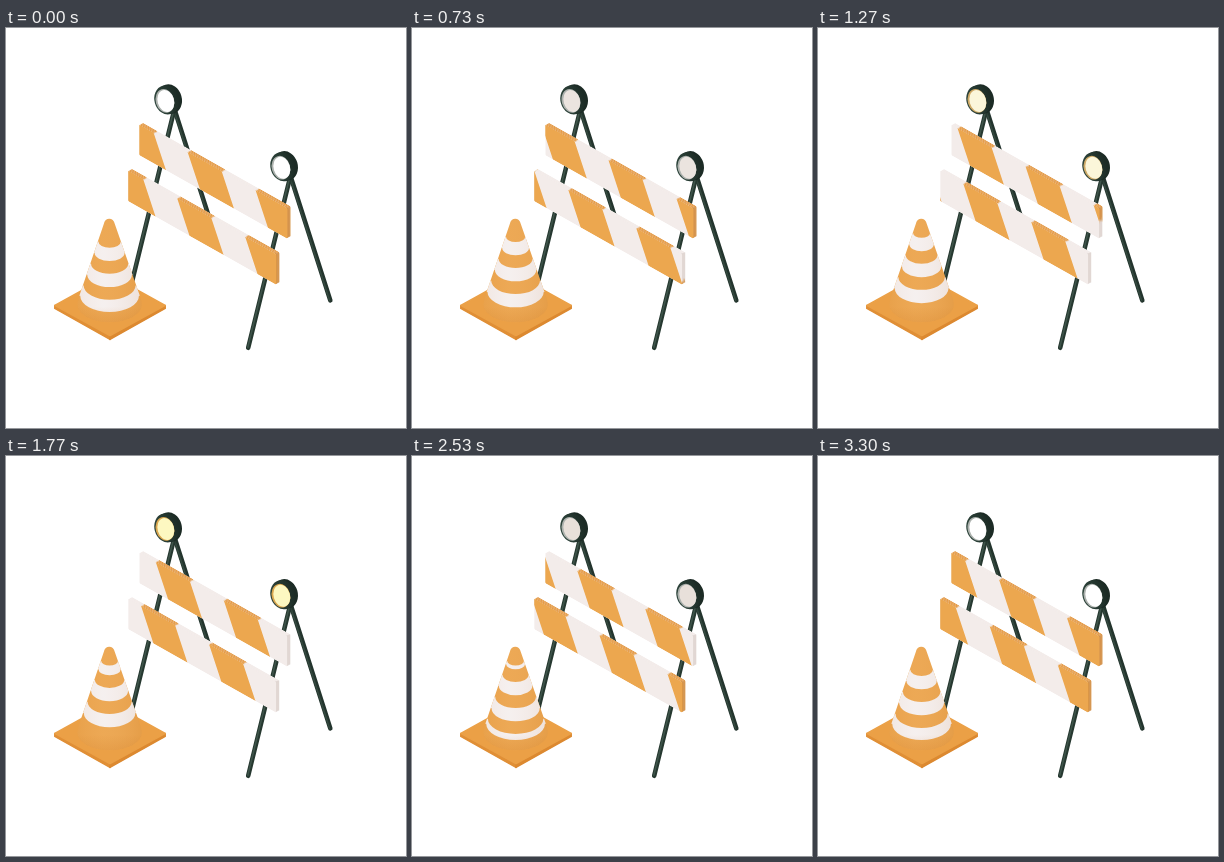
Write an HTML page that moves like this. It is 400 px wide and 400 px high and loops after 3.33 s.

```html
<!DOCTYPE html>
<html lang="en">
<head>
<meta charset="utf-8">
<title>Road barrier</title>
<style>
html, body { margin: 0; width: 100%; height: 100%; overflow: hidden; background: #fff; }
svg { display: block; width: 100%; height: 100%; }
.back { color: #e4973f; }
.front { color: #eca74f; }
</style>
</head>
<body>
<svg viewBox="0 0 400 400" xmlns="http://www.w3.org/2000/svg">
  <defs>
    <linearGradient id="coneShade">
      <stop offset="0" stop-color="#b4651c" stop-opacity=".06"/>
      <stop offset=".4" stop-color="#fff" stop-opacity=".04"/>
      <stop offset="1" stop-color="#a85a14" stop-opacity=".1"/>
    </linearGradient>
    <linearGradient id="coneFoot" x1="0" y1="0" x2="0" y2="1">
      <stop offset=".85" stop-color="#c56a10" stop-opacity="0"/>
      <stop offset="1" stop-color="#c56a10" stop-opacity=".16"/>
    </linearGradient>
    <linearGradient id="rim">
      <stop offset="0" stop-color="#2f463d"/>
      <stop offset="1" stop-color="#1c2b25"/>
    </linearGradient>
    <path id="cone" d="M97.8 196C98.8 189 107.6 189 108.8 196L134.6 270Q136 274 135.8 277A32.2 17.2 0 0 1 71.4 277Q71.2 274 72.6 270Z"/>
    <clipPath id="coneClip"><use href="#cone"/></clipPath>
    <clipPath id="boardClip"><rect width="148" height="30.8" rx="1.3"/></clipPath>
    <g id="trestle">
      <g fill="none" stroke-linecap="round">
        <path d="M169 83L208.3 205.6" stroke="#23342d" stroke-width="4.6"/>
        <path d="M168.4 84L207.6 205.6" stroke="#34493f" stroke-width="1.5"/>
        <path d="M168 83L126.2 253" stroke="#263830" stroke-width="4.6"/>
        <path d="M167.3 84L125.8 252.4" stroke="#3e544a" stroke-width="1.5"/>
      </g>
      <g transform="rotate(-16 162 71.5)">
        <ellipse cx="163.6" cy="71.6" rx="12.2" ry="15" fill="#1c2b25"/>
        <ellipse cx="160.6" cy="71.5" rx="12.2" ry="14.8" fill="url(#rim)"/>
        <ellipse cx="158.7" cy="72" rx="9.2" ry="12" class="edge"/>
        <ellipse cx="159.5" cy="72.3" rx="8.2" ry="11.2" class="lens"/>
      </g>
    </g>
  </defs>

  <use href="#trestle"/>
  <use href="#trestle" x="116" y="66.8"/>
  <g id="boards"></g>

  <g stroke-linejoin="round" stroke-width="1.5" transform="translate(0 -.6)">
    <path d="M48.8 278L104 308.5V312L48.8 281Z" fill="#e08f36" stroke="#e08f36"/>
    <path d="M159.2 278L104 308.5V312L159.2 281Z" fill="#dc8930" stroke="#dc8930"/>
    <path d="M48.8 278L104 247.5L159.2 278L104 308.3Z" fill="#eba046" stroke="#eba046"/>
  </g>
  <use href="#cone" fill="#eca54e"/>
  <path id="bands" fill="#f5efee" clip-path="url(#coneClip)"/>
  <use href="#cone" fill="url(#coneShade)"/>
  <use href="#cone" fill="url(#coneFoot)"/>
</svg>
<script>
const LOOP = 3330, STEP = 68, AXIS = 103.6;
const $ = id => document.getElementById(id);

// Boards: a sheared striped rectangle, with stacked copies behind it for thickness
function board(id, x, y) {
  let stripes = '';
  for (let k = -2; k < 4; k++) {
    const s = k * STEP;
    stripes += `M${s} 0h34l12.5 30.8h-34z`;
  }
  const place = (dx, dy) => `matrix(1 .565 0 1 ${x + dx} ${y + dy})`;
  let back = '';
  for (let i = 4; i > 0; i--) {
    back += `<use class="back" href="#${id}" transform="${place(i * .78, i * -.45)}"/>`;
  }
  return back + `<g class="front" transform="${place(0, 0)}">` +
    '<path d="M147 0l4.1 -3.5v30.3l-4.1 4z" fill="#6b4a3a" fill-opacity=".13"/>' +
    `<g id="${id}" clip-path="url(#boardClip)"><rect width="148" height="30.8" fill="#f3ecea"/>` +
    `<path id="${id}Stripes" d="${stripes}" fill="currentColor"/></g></g>`;
}
$('boards').innerHTML = board('upper', 133.3, 96.4) + board('lower', 122.2, 142.4);

// Front half of the ring whose lowest point is at y
function ring(y) {
  const c = (y + 33.2) / 1.184, r = 5 + .335 * (c - 195);
  return { c, r, ry: r * .55 };
}

function band(top, bottom) {
  const a = ring(bottom), b = ring(top);
  return `M60 ${a.c}H${AXIS - a.r}A${a.r} ${a.ry} 0 0 0 ${AXIS + a.r} ${a.c}H150` +
    `V${b.c}H${AXIS + b.r}A${b.r} ${b.ry} 0 0 1 ${AXIS - b.r} ${b.c}H60Z`;
}

function bands(p) {
  let d = '';
  for (let k = 0; k < 5; k++) {
    const low = 311 - 26 * (p + k);
    const top = Math.max(209.5, low - 13.3), bottom = Math.min(283.8, low);
    if (bottom > top) d += band(top, bottom);
  }
  return d;
}

const rgb = (...v) => `rgb(${v.map(Math.round)})`;
const paint = (cls, color) => document.querySelector('.' + cls).style.fill = color;

function draw(t) {
  const p = (t % LOOP) / LOOP;
  $('upperStripes').setAttribute('transform', `translate(${-19.8 + STEP * p})`);
  $('lowerStripes').setAttribute('transform', `translate(${48.9 - STEP * p})`);
  $('bands').setAttribute('d', bands(p));

  // Lamp goes white, dim, yellow, dim
  const wave = Math.cos(p * 2 * Math.PI);
  const white = Math.max(0, wave), y = Math.max(0, -wave);
  const glow = 1 - (1 - y) ** 2;
  paint('lens', rgb(230 + 25 * white + 23 * glow, 222 + 33 * white + 26 * glow,
    215 + 40 * white + 25 * glow - 50 * y ** 3));
  paint('edge', rgb(172 + 48 * y, 177 - 10 * y, 173 - 95 * y));
}

function tick() {
  draw(performance.now());
  requestAnimationFrame(tick);
}
tick();
</script>
</body>
</html>
```
